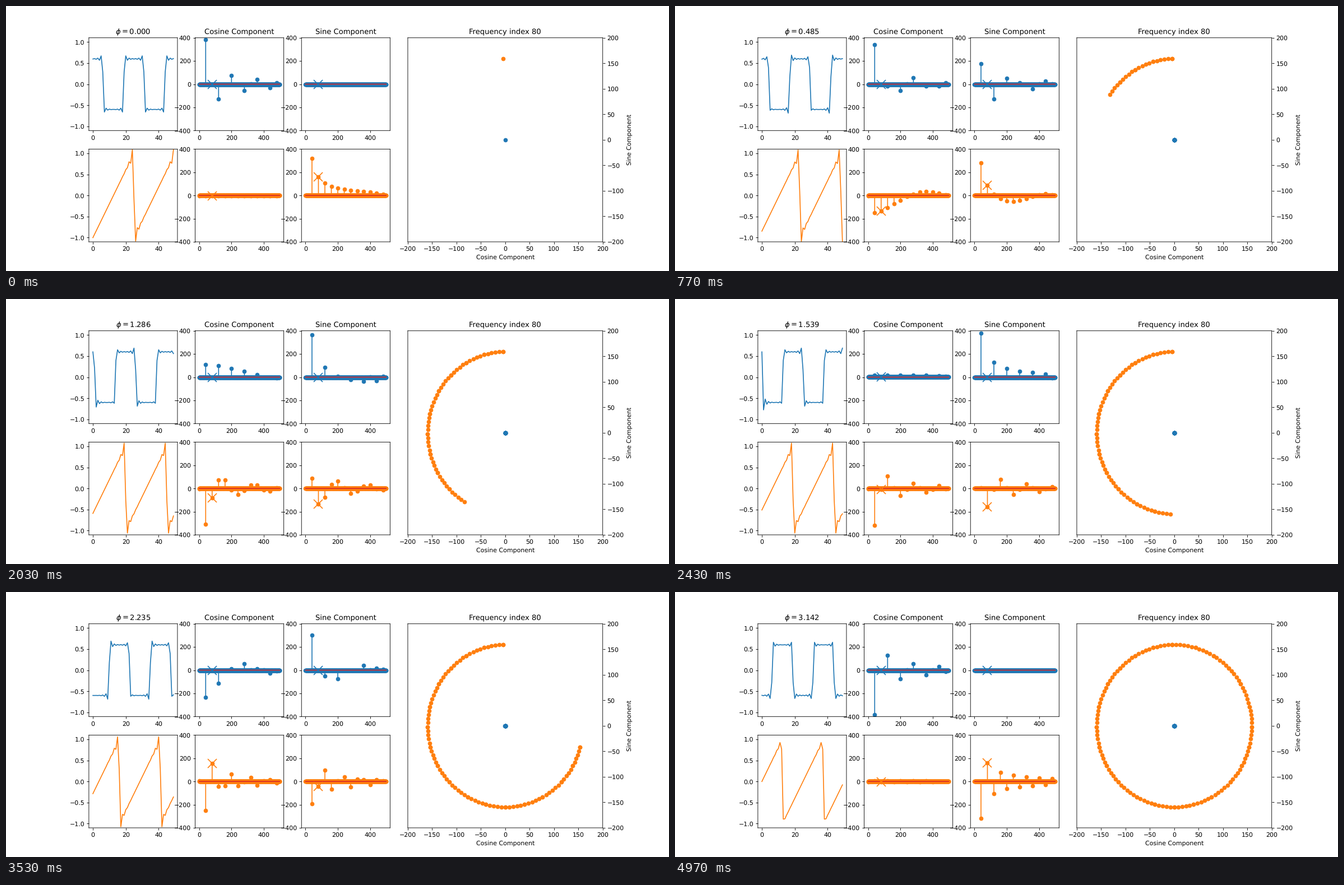
Write a matplotlib script that moves like this. It is 1183 px wide and 473 px high and loops after 5010 ms.

```python
import numpy as np
import matplotlib.pyplot as plt
from matplotlib.animation import FuncAnimation

STEPS, FPS = 150, 30                    # phase steps and their rate
TICK_MS, LOOP_MS = 30, 5010
OVER, SAMPLES, PERIOD = 10, 1000, 25    # oversampling, samples, samples per cycle
SHOWN, BIN = 50, 80
ORDER, PAD, TAIL = 8, 27, 1000

# Soft, unsnapped edges throughout
plt.rcParams.update({"path.snap": False, "text.hinting": "none"})

phis = np.linspace(0, np.pi, STEPS)


def phase():
    """Cycle position in [0, 1) per step and fine sample, in exact integers."""
    n = np.arange(SAMPLES * OVER)
    j = np.arange(STEPS)[:, None]
    cycle, half = PERIOD * OVER, 2 * (STEPS - 1)
    return (n * half + j * cycle) % (cycle * half) / (cycle * half)


def decimate(x):
    """Zero-phase Butterworth low-pass, then keep every OVER-th sample."""
    ext = np.pad(x, ((0, 0), (PAD, PAD)), "reflect", reflect_type="odd")
    ext = np.pad(ext, ((0, 0), (TAIL, TAIL)), "edge")
    f = np.fft.rfftfreq(ext.shape[1])
    ratio = np.tan(np.pi * f) / np.tan(np.pi / (2 * OVER))
    gain = 1 / (1 + ratio ** (2 * ORDER))
    y = np.fft.irfft(np.fft.rfft(ext) * gain, ext.shape[1])
    start = PAD + TAIL
    return y[:, start:start + SAMPLES * OVER:OVER]


p = phase()
square = decimate(np.where((p + 0.25) % 1 < 0.5, 0.6, -0.6))
saw = decimate(2 * p - 1)

fig = plt.figure(figsize=(15, 5.998), dpi=78.867)
grid = fig.add_gridspec(2, 5)
bins = np.arange(SAMPLES // 2)


class Stems:
    def __init__(self, ax, values, color):
        self.values = values
        self.dots, self.bars, _ = ax.stem(
            bins, values[0], linefmt=color + "-", markerfmt=color + "o", basefmt="C3-")
        self.cross, = ax.plot([BIN], [values[0, BIN]], color + "x", ms=14, mew=1.5)
        ax.set_ylim(-400, 400)

    def update(self, k):
        v = self.values[k]
        self.dots.set_ydata(v)
        segs = np.zeros((len(bins), 2, 2))
        segs[:, :, 0] = bins[:, None]
        segs[:, 1, 1] = v
        self.bars.set_segments(segs)
        self.cross.set_ydata([v[BIN]])


class Row:
    def __init__(self, row, signal, color):
        self.signal = signal[:, :SHOWN]
        self.spec = np.fft.rfft(signal)[:, :SAMPLES // 2]
        self.axes = [fig.add_subplot(grid[row, c]) for c in range(3)]
        self.wave, = self.axes[0].plot(self.signal[0], color)
        self.axes[0].set_ylim(-1.1, 1.1)
        self.stems = [Stems(self.axes[1], self.spec.real, color),
                      Stems(self.axes[2], self.spec.imag, color)]
        self.color = color

    def add_trace(self, ax):
        self.trace, = ax.plot([], [], self.color + "o")

    def update(self, k):
        self.wave.set_ydata(self.signal[k])
        for s in self.stems:
            s.update(k)
        z = self.spec[:k + 1, BIN]
        self.trace.set_data(z.real, z.imag)


rows = [Row(0, square, "C0"), Row(1, saw, "C1")]
title = rows[0].axes[0].set_title("")
rows[0].axes[1].set_title("Cosine Component")
rows[0].axes[2].set_title("Sine Component")

plane = fig.add_subplot(grid[:, 3:])
plane.set(xlim=(-200, 200), ylim=(-200, 200), title=f"Frequency index {BIN}",
          xlabel="Cosine Component", ylabel="Sine Component")
plane.yaxis.tick_right()
plane.yaxis.set_label_position("right")
for r in rows:
    r.add_trace(plane)


def update(i):
    # Newest step that begins within this tick, to the nearest 10 ms
    k = min((i * TICK_MS + 25) * FPS // 1000, STEPS - 1)
    title.set_text(rf"$\phi = {phis[k]:.3f}$")
    for r in rows:
        r.update(k)
    return []


anim = FuncAnimation(fig, update, frames=LOOP_MS // TICK_MS, interval=TICK_MS, repeat=True)
plt.show()
```
